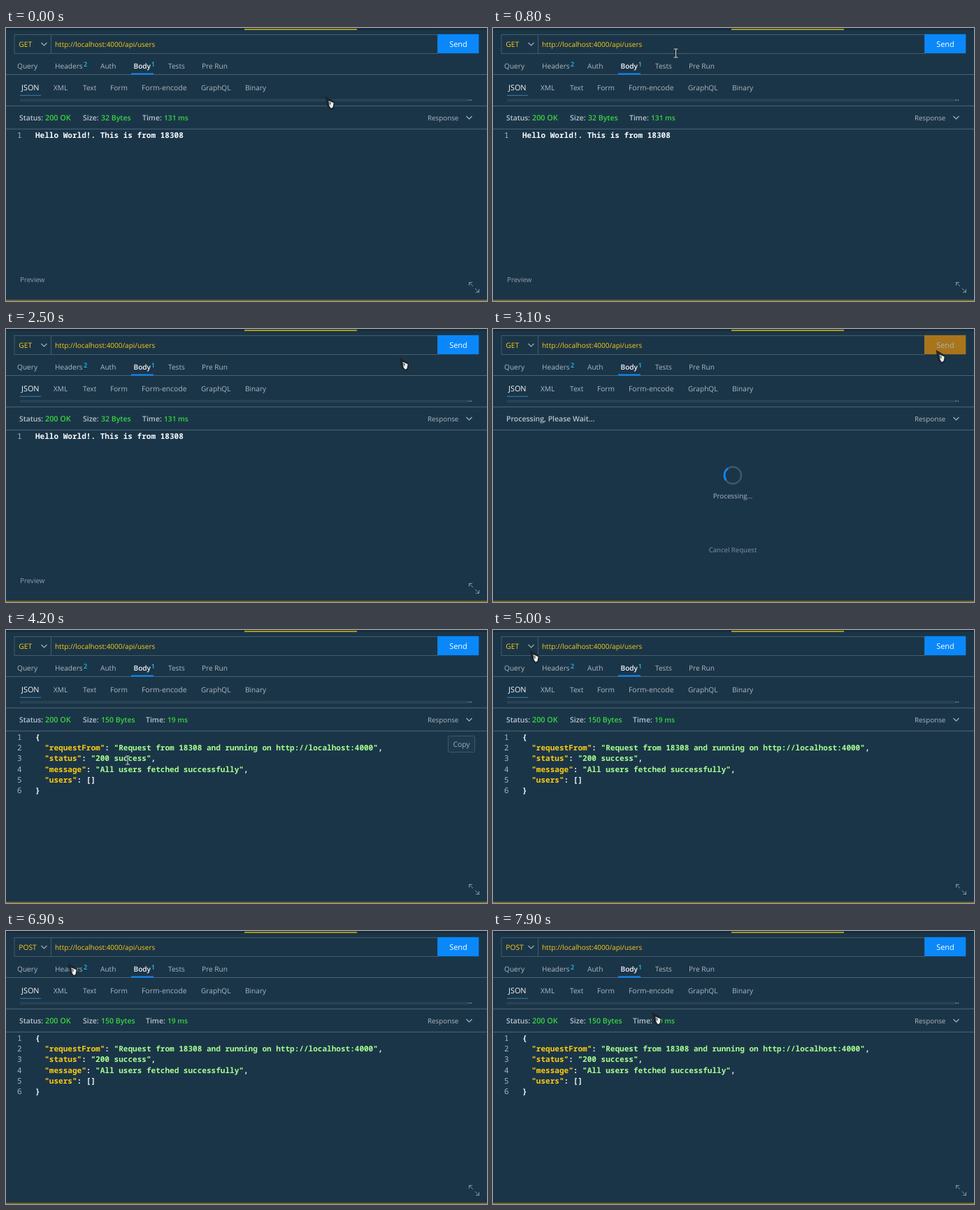
These frames come from a looping animation (688 px wide and 390 px high, 8 s). An HTML page:

```html
<!DOCTYPE html>
<html lang="en">
<head>
<meta charset="utf-8">
<title>API client</title>
<style>
html, body { margin: 0; width: 100%; height: 100%; overflow: hidden; background: #1b3548; }
svg { display: block; width: 688px; height: 390px; }
text { font-family: "Open Sans", "Noto Sans", sans-serif; white-space: pre; text-rendering: geometricPrecision; }
.mono { font-family: "Noto Sans Mono", "DejaVu Sans Mono", monospace; font-size: 11.04px; font-weight: 600; }
</style>
</head>
<body>
<svg id="stage" viewBox="0 0 688 390" xmlns="http://www.w3.org/2000/svg"></svg>
<script>
const LOOP = 8000, STEP = 100;
const GREY = '#acb8c0', WHITE = '#f6f8fa', YELLOW = '#fbcb14', GREEN = '#35d83f',
      BLUE = '#0a88fa', EDGE = '#465b69', LABEL = '#b9c5cd', STRING = '#a5ff90';

const text = (x, y, s, size = 10.15, fill = GREY, extra = '') =>
  `<text x="${x}" y="${y}" font-size="${size}" fill="${fill}" ${extra}>${s}</text>`;
const rect = (x, y, w, h, fill, extra = '') =>
  `<rect x="${x}" y="${y}" width="${w}" height="${h}" fill="${fill}" ${extra}/>`;
const line = (d, stroke, width = 1, extra = '') =>
  `<path d="${d}" fill="none" stroke="${stroke}" stroke-width="${width}" ${extra}/>`;
const group = (id, body) => `<g id="${id}">${body}</g>`;
const bold = 'font-weight="600"', middle = 'text-anchor="middle"';

// Response editor
const CELL = 6.624;
const rowY = i => 156.8 + i * 15.3;
const code = (row, col, s, fill = WHITE) =>
  `<text class="mono" x="${42 + col * CELL}" y="${rowY(row)}" fill="${fill}">${s}</text>`;
const rowNumber = i =>
  `<text class="mono" x="16" y="${rowY(i)}" fill="#a9b6be" style="font-weight:400">${i + 1}</text>`;

function pair(row, key, value, color, comma) {
  const k = `"${key}"`, start = 2 + k.length;
  return code(row, 2, k, YELLOW) + code(row, start, ':') + code(row, start + 2, value, color) +
    (comma ? code(row, start + 2 + value.length, ',') : '');
}

const json = [0, 1, 2, 3, 4, 5].map(rowNumber).join('') + code(0, 0, '{') +
  pair(1, 'requestFrom', '"Request from 18308 and running on http://localhost:4000"', STRING, true) +
  pair(2, 'status', '"200 success"', STRING, true) +
  pair(3, 'message', '"All users fetched successfully"', STRING, true) +
  pair(4, 'users', '[]', WHITE, false) + code(5, 0, '}');

function status(size, time, timeX) {
  const y = 132;
  return text(19, y, 'Status:', 10.3, LABEL, bold) + text(56, y, '200 OK', 10.8, GREEN, bold) +
    text(110, y, 'Size:', 10.5, LABEL, bold) + text(136, y, size, 10.5, GREEN, bold) +
    text(timeX, y, 'Time:', 10.5, LABEL, bold) + text(timeX + 31, y, time, 10.2, GREEN, bold);
}

const tabs = [[16, 'Query'], [70, 'Headers'], [135, 'Auth'], [232, 'Tests'], [280, 'Pre Run']];
const kinds = [[68, 'XML'], [110, 'Text'], [149, 'Form'], [194, 'Form-encode', 10.4],
  [279, 'GraphQL'], [342, 'Binary']];
const verbs = ['GET', 'POST', 'PUT', 'DELETE', 'PATCH', 'HEAD', 'OPTIONS', 'PROPFIND', 'CUSTOM'];
const verbY = i => 45 + i * 14.25;
const row = (items, y) => items.map(([x, s, size]) => text(x, y, s, size)).join('');

const frame =
  rect(0, 0, 688, 390, '#1b3548') + rect(0, 0, 688, 2.6, '#172a3a') +
  rect(341, 1.2, 161, 1.6, '#cbb514') + rect(0, 388.2, 688, 1.8, '#75651f') +
  rect(64.5, 9.5, 553, 27, 'none', `stroke="${EDGE}"`) +
  rect(12, 9.5, 52.5, 27, 'none', `id="select" stroke="${EDGE}"`) +
  line('M50.5 21l4 4 4-4', '#aab4b4', 1.1) +
  text(70, 26.5, 'http://localhost:4000/api/users', 9.98, YELLOW) +
  row(tabs, 57.5) + text(182.5, 57.5, 'Body', 10.1, WHITE, bold) +
  text(111, 54.7, '2', 9.2, '#1cc0f5', bold) + text(207.8, 54.7, '1', 9.2, '#1cc0f5', bold) +
  line('M0 66.5H688', '#4a6171') + rect(179, 64.5, 32, 2, BLUE) +
  text(22, 88.8, 'JSON', 10.9, WHITE, 'font-weight="500"') + row(kinds, 88.8) +
  line('M20 96.3H50', '#3d86bd', 0.9) +
  line('M20 102.2H661M20 104.2H661', '#3e5565', 0.8) +
  line('M661.5 102l1.5 2M664.5 102l1.5 2', GREY, 0.9) +
  line('M0 111.3H688M0 144.3H688', '#4f6676') +
  text(603, 132, 'Response', 9.8) + line('M658.5 126l4 4 4-4', GREY, 1.1);

const dropdown =
  rect(12.5, 37.5, 55, 127, '#1b3040', 'stroke="#304858"') +
  rect(12.3, 0, 55.4, 14.2, '#2492ff', 'id="pick"') +
  '<g clip-path="url(#menu)">' +
  verbs.map((v, i) => text(19, verbY(i) + 3.6, v, 10, YELLOW)).join('') + '</g>';

const arrow =
  '<path d="M-1 -1.5L11.5 6 11 14.5 7.5 17.5 2 13Z" fill="#1a242c" stroke="#1a242c" stroke-linejoin="round" opacity=".9"/>' +
  '<path d="M3.4 4.4L10.6 7.6 9.6 13.6 7 15.2 4.6 12Z" fill="#eeeeec"/>' +
  '<path d="M3.6 5.4L7 7.6 5.8 11.2Z" fill="#59636a"/>';
const beamPath = 'M-3 -6H3M0 -6V6M-3 6H3';
const beam = line(beamPath, '#142430', 2.6) + line(beamPath, '#d5dbde', 1.1);

const stage = document.getElementById('stage');
stage.innerHTML =
  '<clipPath id="menu"><rect x="12" y="37" width="56" height="127"/></clipPath>' + frame +
  text(18.2, 26.5, 'GET', 10.3, YELLOW, 'id="verb"') +
  group('send', rect(617.3, 8.8, 59, 27.4, BLUE, 'id="sendBox"') + text(647, 26.5, 'Send', 11, '#fff', middle)) +
  group('before', status('32 Bytes', '131 ms', 195) + rowNumber(0) +
    code(0, 0, 'Hello World!. This is from 18308') + text(20, 363, 'Preview', 9.8, '#93a2ac')) +
  group('busy', text(19, 132, 'Processing, Please Wait...', 10.5, LABEL, bold) +
    '<circle cx="343" cy="209" r="12" fill="none" stroke="#40586a" stroke-width="2.4"/>' +
    line('M334.5 217.5A12 12 0 0 1 334.5 200.5', '#0d8bff', 2.6, 'id="arc"') +
    text(343, 242, 'Processing...', 9.75, GREY, middle) +
    text(343, 318.8, 'Cancel Request', 9.6, '#7f909c', middle)) +
  group('after', status('150 Bytes', '19 ms', 200) + json) +
  group('copy', rect(632.5, 151.5, 38, 23, '#1d394c', 'rx="2" stroke="#40586a"') +
    text(651.5, 167, 'Copy', 10.4, '#a0aeb8', middle)) +
  group('expand', line('M662.5 368V363.5H667M662.5 363.5L668 369M676.5 373V377.5H672M676.5 377.5L671 372', '#8e9da7', 0.9)) +
  group('list', dropdown) + group('arrow', arrow) + group('beam', beam);

const $ = id => document.getElementById(id);
const show = (id, on) => $(id).setAttribute('display', on ? 'inline' : 'none');

// Pointer path: time, x, y
const path = [
  [0, 458, 99.5], [400, 458, 99.5], [500, 440, 92], [700, 300, 45], [900, 223, 27], [1000, 223, 27],
  [1300, 390, 60], [1600, 571, 18], [1900, 614, 20], [2000, 611, 22], [2300, 492, 48],
  [2600, 600, 40], [2800, 638, 32], [3100, 635, 32], [3700, 635, 32], [3900, 590, 52],
  [4100, 260, 176], [4200, 174, 186], [4400, 92, 197], [4500, 100, 155], [4600, 126, 49],
  [5100, 36, 26], [5500, 54, 28], [5700, 54, 28], [5900, 44, 56], [6400, 44, 56],
  [6900, 90, 48], [7300, 176, 34], [7400, 181, 41], [7900, 229, 118], [8000, 229, 118]
];

function pointer(t) {
  const i = Math.max(1, path.findIndex(p => p[0] >= t));
  const [t0, x0, y0] = path[i - 1], [t1, x1, y1] = path[i];
  const k = (t - t0) / (t1 - t0);
  return [x0 + (x1 - x0) * k, y0 + (y1 - y0) * k];
}

function draw(ms) {
  const t = Math.floor((ms % LOOP) / STEP) * STEP;
  const [x, y] = pointer(t);
  const busy = t >= 3000 && t < 3400, done = t >= 3400, open = t >= 5600 && t < 6100;
  const inUrl = x > 65 && x < 617 && y > 9 && y < 37;
  const inEditor = y > 145;
  const onSend = x >= 618 && x < 676 && y > 9 && y < 36;
  const typing = inUrl || inEditor;

  show('before', t < 3000);
  show('busy', busy);
  show('after', done);
  show('expand', !busy);
  show('copy', done && inEditor);
  show('list', open);
  show('arrow', !typing);
  show('beam', typing);

  $('arc').setAttribute('transform', `rotate(${10 + (t - 3100) * 0.36} 343 209)`);
  $('sendBox').setAttribute('fill', onSend ? '#ff9d00' : BLUE);
  $('send').setAttribute('opacity', busy ? 0.62 : 1);
  $('verb').textContent = t >= 6100 ? 'POST' : 'GET';
  $('select').setAttribute('stroke', t >= 5600 && t < 6500 ? '#72848f' : EDGE);
  $('pick').setAttribute('y', verbY(y > 52 ? 1 : 0) - 7.2);
  for (const id of ['arrow', 'beam']) $(id).setAttribute('transform', `translate(${x} ${y})`);
}

const start = performance.now();
function tick() {
  draw(performance.now() - start);
  requestAnimationFrame(tick);
}
tick();
</script>
</body>
</html>
```
